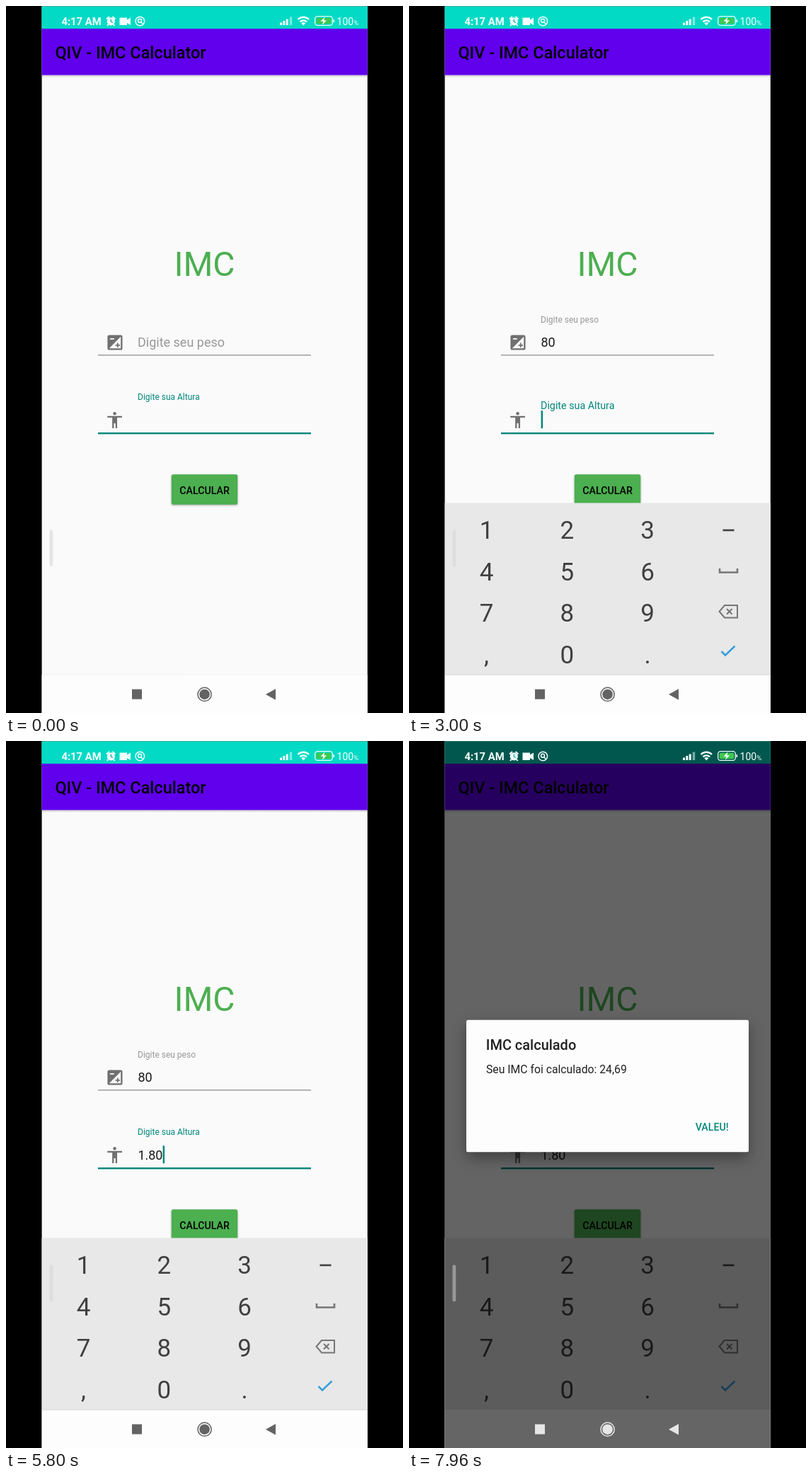
These frames come from a looping animation (561x998 px, 8 s). An HTML page:

```html
<!DOCTYPE html>
<html lang="pt">
<head>
<meta charset="utf-8">
<title>IMC Calculator</title>
<style>
  html, body { margin: 0; width: 100%; height: 100%; overflow: hidden; background: #000; }
  svg { display: block; width: 561px; height: 998px; font-family: Roboto, "Noto Sans", sans-serif; }
  .med { font-weight: 500; }
  .mid { text-anchor: middle; }
  .input { font-size: 18px; fill: #191919; }
  .icon { fill: #707070; }
  #dialog rect { filter: drop-shadow(0 8px 10px rgba(0, 0, 0, .36)); }
  #button rect { filter: drop-shadow(0 1.5px 1.5px rgba(0, 0, 0, .35)); }
</style>
</head>
<body>
<svg viewBox="0 0 561 998">
  <defs>
    <clipPath id="phone"><rect x="50.6" y=".5" width="460.2" height="998"/></clipPath>
    <clipPath id="kbArea"><rect x="50" y="600" width="461" height="344"/></clipPath>
    <linearGradient id="barShade" x2="0" y2="1">
      <stop stop-opacity=".2"/><stop offset="1" stop-opacity="0"/>
    </linearGradient>
  </defs>
  <rect width="561" height="998"/>
  <g clip-path="url(#phone)">
    <rect x="50" width="461" height="998" fill="#fafafa"/>
    <rect x="50" y="97.5" width="461" height="3.5" fill="url(#barShade)"/>
    <rect x="50" y="32" width="461" height="65.5" fill="#6000ec"/>
    <text class="med" x="69.4" y="74.4" font-size="23.5">QIV - IMC Calculator</text>
    <text class="mid" x="280.5" y="380.5" font-size="48" fill="#4caf50">IMC</text>

    <path class="icon" transform="translate(139.9 460.9) scale(1.173)" d="M19 3H5c-1.1 0-2 .9-2 2v14c0 1.1.9 2 2 2h14c1.1 0 2-.9 2-2V5c0-1.1-.9-2-2-2zM6 7h5v1.500H6zM19 19H5L19 5zM14.500 16v2H16v-2h2v-1.500h-2v-2h-1.500v2h-2V16z"/>
    <path class="icon" transform="translate(139.8 570.6) scale(1.15)" d="M12 2a2 2 0 0 1 0 4 2 2 0 0 1 0-4zM21 9h-6v13h-2v-6h-2v6H9V9H3V7h18z"/>
    <g id="fields"></g>

    <g id="button">
      <rect x="233.8" y="661.3" width="93.4" height="42.5" rx="2.5" fill="#4caf50"/>
      <text class="med mid" x="280.5" y="688.6" font-size="14.2">CALCULAR</text>
      <path id="ripple" d="M234 661.5h93v42.5h-93z" fill="#000" opacity="0"/>
    </g>

    <rect x="50" y="944" width="461" height="54" fill="#fdfdfd"/>
    <g clip-path="url(#kbArea)">
      <g id="keyboard">
        <rect x="50" y="701.5" width="461" height="243" fill="#e8e8e8"/>
        <rect id="press" width="114.5" height="58.4" fill="#000" opacity="0"/>
        <g id="keys" class="mid" font-size="35" fill="#404040"></g>
        <g fill="none" stroke="#757575" stroke-width="2">
          <path d="M443.500 740h16" stroke="#404040" stroke-width="2.6"/>
          <path d="M439 794v5.5h25v-5.5" stroke-width="2.6"/>
          <path d="M446 846h18v17.500h-18l-7.500-8.750zM449 851l7.500 7.500m0-7.500l-7.500 7.500"/>
          <path id="tab" stroke="#359fda" stroke-width="2.300" d="M438 910h18.500M450.500 903.500l6.500 6.500-6.500 6.500M462 902.500v15"/>
          <path id="check" stroke="#359fda" stroke-width="2.500" d="M441.500 911l5.500 5.500 13.500-13"/>
        </g>
      </g>
    </g>
    <path id="divider" d="M50 944h461" stroke="#d6d6d0"/>

    <rect x="50" width="461" height="32" fill="#03dac5"/>
    <rect id="dim" x="50" width="461" height="998" opacity="0"/>

    <g fill="#f6fffe">
      <text x="78.400" y="27" font-size="14.800" font-weight="700">4:17 AM</text>
      <circle cx="148.300" cy="21.800" r="5.600"/>
      <path d="M142 18.500l4-3.500M154.500 18.500l-4-3.500M144.500 26l-1.500 2M152 26l1.500 2" stroke="#f6fffe" stroke-width="2"/>
      <path d="M148.300 18.500v3.500l2.500 1.500" stroke="#07a899" stroke-width="1.300" fill="none"/>
      <path d="M160.500 16.500h10.500v3l5-3v10.500l-5-3v3h-10.500z"/>
      <g fill="none" stroke="#f6fffe" stroke-width="1.500">
        <circle cx="189.300" cy="21.500" r="6.300"/>
        <circle cx="189" cy="20.800" r="2.500"/>
        <path d="M190.500 22.500l3.500 3.500"/>
      </g>
      <path d="M387 23.500h3v3.500h-3zM391.300 21h3v6h-3zM395.700 18.500h3v8.500h-3z"/>
      <path d="M400.800 15.500h3.400v11.500h-3.400z" opacity=".5"/>
      <g fill="none" stroke="#f6fffe" stroke-width="2.400">
        <path d="M412.500 19a11 11 0 0 1 15.500 0M415.500 22.300a6.700 6.700 0 0 1 9.500 0"/>
      </g>
      <path d="M417.300 24.300a4.200 4.200 0 0 1 6 0l-3 3.200z"/>
      <rect x="436.700" y="14.700" width="24.600" height="12.600" rx="3.500" fill="none" stroke="#e8fffb" stroke-width="1.300"/>
      <rect x="438.700" y="16.700" width="20.600" height="8.600" rx="2" fill="#3cc84f"/>
      <path d="M462.500 19h1.500v4h-1.500z"/>
      <path d="M450.500 15.500l-6 6.200h3.800l-1.300 5 6-6.400h-3.700z"/>
      <text x="467.600" y="27" font-size="14">100<tspan font-size="9.500">%</tspan></text>
    </g>

    <g id="nav" fill="#636363">
      <path d="M178 964.500h14v14h-14zM367 971.700l14-7.700v15.400z"/>
      <circle cx="280.600" cy="971.700" r="7.300"/>
      <circle id="ring" cx="280.600" cy="971.700" r="9.600" fill="none" stroke="#636363" stroke-width="1.500"/>
    </g>
    <rect x="61.500" y="739.500" width="4.800" height="52" rx="2.400" fill="#d4d4d6" opacity=".5"/>

    <g id="dialog" opacity="0">
      <rect x="81" y="393.700" width="399" height="186.500" rx="2.500" fill="#fdfdfd"/>
      <text class="med" x="108.800" y="436.300" font-size="19.950" fill="#212121">IMC calculado</text>
      <text x="109" y="468.500" font-size="15.750" fill="#212121">Seu IMC foi calculado: 24,69</text>
      <text class="med" x="404.700" y="549.600" font-size="14.200" fill="#02867c">VALEU!</text>
    </g>
  </g>
</svg>
<script>
const LOOP = 8000, BLINK = 500, LABEL_MS = 167;
const TO_WEIGHT = 920, TO_HEIGHT = 2934;
const GREY = '#989898', TEAL = '#02867c';

// [time, text] for each field
const weightText = [[0, ''], [2080, '8'], [2480, '80']];
const heightText = [[0, ''], [3840, '1'], [4400, '1.'], [5320, '1.8'], [5760, '1.80']];
// [down, up, column, row]
const presses = [
  [1990, 2080, 1, 2], [2400, 2500, 1, 3], [2860, 2930, 3, 3], [3760, 3880, 0, 0],
  [4260, 4420, 2, 3], [5200, 5340, 1, 2], [5660, 5790, 1, 3]
];
// Times at which the caret becomes solid and its blinking restarts
const caretStarts = [-720, TO_WEIGHT, 2080, 2480, TO_HEIGHT, 3840, 4400, 5320, 5760];

const $ = id => document.getElementById(id);
const clamp = v => Math.min(1, Math.max(0, v));
const ramp = (t, from, to) => clamp((t - from) / (to - from));
const mix = (a, b, p) => a + (b - a) * p;
const at = (steps, t) => steps.filter(s => s[0] <= t).pop()[1];
const show = (el, on) => el.setAttribute('visibility', on ? 'visible' : 'hidden');
const fade = (id, v) => $(id).setAttribute('opacity', v);

function make(parent, tag, attrs, text = '') {
  const el = document.createElementNS('http://www.w3.org/2000/svg', tag);
  for (const k in attrs) el.setAttribute(k, attrs[k]);
  el.textContent = text;
  return parent.appendChild(el);
}

// Material curve cubic-bezier(.4, 0, .2, 1)
function standard(x) {
  let lo = 0, hi = 1, u = .5;
  for (let i = 0; i < 18; i++) {
    u = (lo + hi) / 2;
    const bx = 1.2 * u * (1 - u) ** 2 + .6 * u * u * (1 - u) + u ** 3;
    if (bx < x) lo = u; else hi = u;
  }
  return 3 * u * u * (1 - u) + u ** 3;
}
const swing = (t, start) => standard(ramp(t, start, start + LABEL_MS));

['123', '456', '789', ',0.'].forEach((row, r) => [...row].forEach((key, c) =>
  make($('keys'), 'text', { x: 109.5 + c * 113.8, y: 752.3 + r * 58.4 }, key)));

function field(y, label) {
  const g = $('fields');
  const line = make(g, 'rect', { x: 130, y: y - .7, width: 301 });
  const hint = make(g, 'text', { x: 186 }, label);
  const value = make(g, 'text', { x: 186.4, y: y - 12, class: 'input' });
  const caret = make(g, 'rect', { y: y - 31.5, width: 2.5, height: 25, fill: TEAL });
  return ({ focused, small, text, caretOn }) => {
    line.setAttribute('height', focused ? 2.4 : 1.1);
    line.setAttribute('fill', focused ? TEAL : '#7c7c7c');
    hint.setAttribute('y', mix(y - 12.5, y - 46.5, small));
    hint.setAttribute('font-size', mix(18, 12, small));
    hint.setAttribute('fill', focused ? TEAL : GREY);
    if (value.textContent !== text) value.textContent = text;
    const width = [...text].reduce((w, c) => w + (c === '.' ? 4.7 : 10.1), 0);
    caret.setAttribute('x', 186.6 + width);
    show(caret, focused && caretOn);
  };
}
const weight = field(493, 'Digite seu peso');
const height = field(602.7, 'Digite sua Altura');

function render(t) {
  const onWeight = t >= TO_WEIGHT && t < TO_HEIGHT;
  const a = swing(t, TO_WEIGHT), b = swing(t, TO_HEIGHT);
  const since = t - caretStarts.filter(s => s <= t).pop();
  const caretOn = t < 800 ? t >= 280 : since % (2 * BLINK) < BLINK;

  weight({ focused: onWeight, small: a, text: at(weightText, t), caretOn });
  height({
    focused: !onWeight, small: 1 - a + b, text: at(heightText, t),
    caretOn: caretOn && t < 6260
  });

  const up = 1 - (1 - ramp(t, 1080, 1360)) ** 3;
  $('keyboard').setAttribute('transform', `translate(0 ${(1 - up) * 243})`);
  show($('tab'), t < TO_HEIGHT);
  show($('check'), t >= TO_HEIGHT);

  const key = presses.find(p => t >= p[0] && t < p[1]);
  if (key) {
    $('press').setAttribute('x', 51 + key[2] * 114.8);
    $('press').setAttribute('y', 710.6 + key[3] * 58.4);
  }
  fade('press', key ? .07 : 0);
  fade('ripple', .14 * ramp(t, 6080, 6180) * (1 - ramp(t, 6240, 6310)));

  fade('dim', .6 * ramp(t, 6284, 6440));
  fade('dialog', ramp(t, 6268, 6400));
  const light = t >= 6280;
  const ink = light ? '#e6e6e6' : '#636363';
  $('nav').setAttribute('fill', ink);
  $('ring').setAttribute('stroke', ink);
  fade('divider', light ? 0 : mix(.3, 1, up));
}

const start = performance.now();
function tick() {
  render((performance.now() - start) % LOOP);
  requestAnimationFrame(tick);
}
tick();
</script>
</body>
</html>
```
